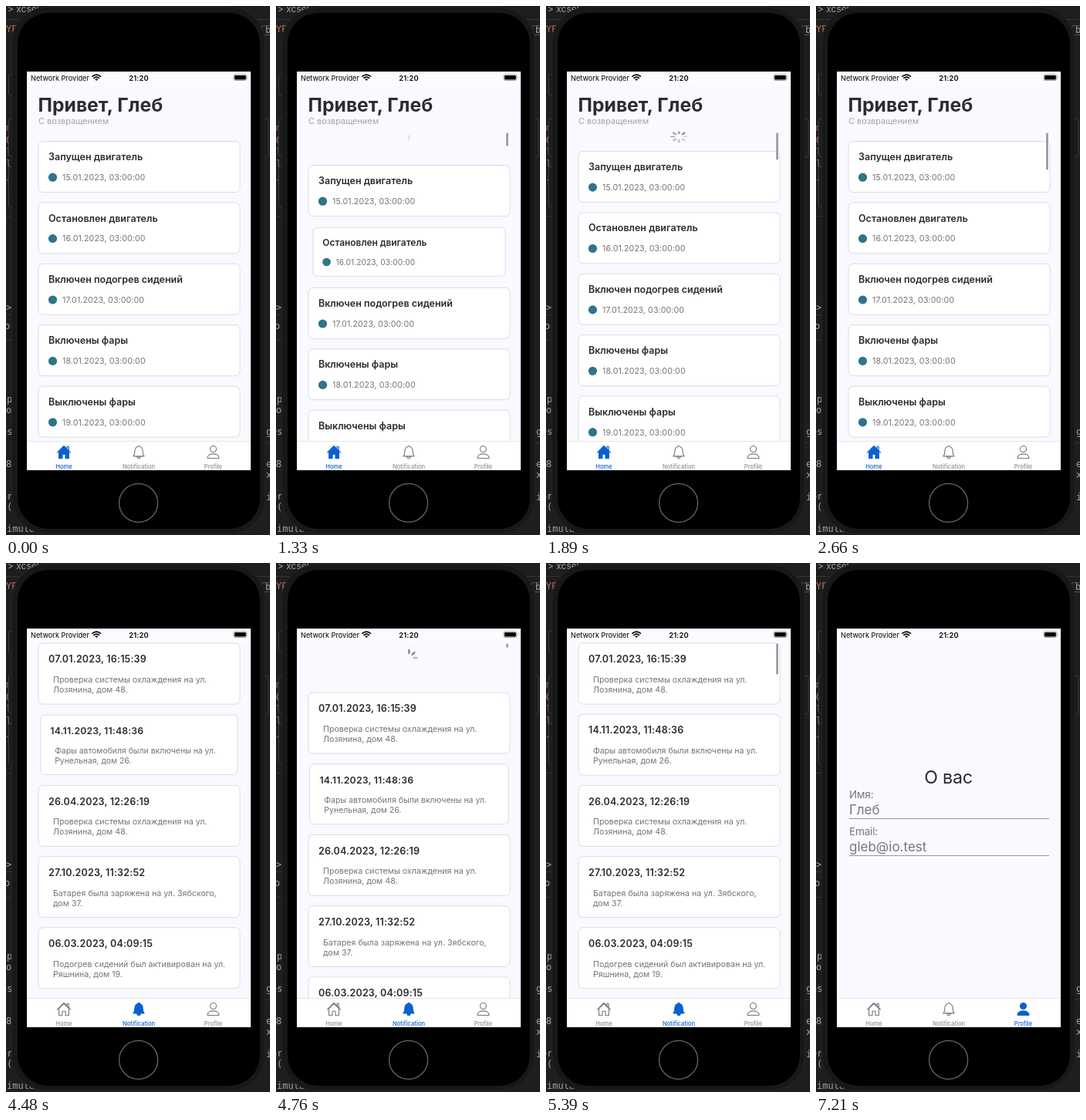
An HTML page for the animation above (8000 ms loop, 342 by 686 pixels).

```html
<!DOCTYPE html>
<html lang="ru">
<head>
<meta charset="utf-8">
<style>
html, body { margin: 0; width: 100%; height: 100%; overflow: hidden; background: #1e1e1e; }
svg { display: block; width: 342px; height: 686px; font-family: Inter, Roboto, sans-serif; }
.code { font: 12px "DejaVu Sans Mono", monospace; fill: #a3a3a3; }
.title { font-size: 12.5px; font-weight: 600; fill: #2b2b30; }
.body { font-size: 10.65px; fill: #747476; }
.title.date { letter-spacing: .18px; }
.body.date { letter-spacing: .09px; }
.card rect { fill: #fff; stroke: #d9dce2; }
.tab { fill: none; stroke: #77777b; stroke-width: 1.1; stroke-linejoin: round; stroke-linecap: round; }
.tab text { font-size: 7.6px; font-weight: 500; fill: #8e8e93; stroke: none; text-anchor: middle; }
.tab.on { stroke: #0a60cf; }
.tab.on .shape { fill: #0a60cf; }
.tab.on text { fill: #0a60cf; }
</style>
</head>
<body>
<svg id="stage" viewBox="0 0 342 686"></svg>
<script>
const LOOP = 8000, STEP = 70;
const stage = document.getElementById('stage');

const text = (x, y, s, attrs = '') => `<text x="${x}" y="${y}" ${attrs}>${s}</text>`;
const rect = (x, y, w, h, r, attrs) =>
  `<rect x="${x}" y="${y}" width="${w}" height="${h}" rx="${r}" ${attrs}/>`;

// Cards are drawn around their own centre so that a press can scale them.
const card = (i, top, pitch, height, content) =>
  `<g class="card" data-y="${top + i * pitch + height / 2}">
    ${rect(-130.5, -height / 2, 261, height, 6, '')}
    <g transform="translate(-172.5 ${-height / 2})">${content}</g></g>`;

const events = ['Запущен двигатель', 'Остановлен двигатель', 'Включен подогрев сидений',
  'Включены фары', 'Выключены фары'];
const notices = [
  ['07.01.2023, 16:15:39', 'Проверка системы охлаждения на ул.', 'Лозянина, дом 48.'],
  ['14.11.2023, 11:48:36', 'Фары автомобиля были включены на ул.', 'Рунельная, дом 26.'],
  ['26.04.2023, 12:26:19', 'Проверка системы охлаждения на ул.', 'Лозянина, дом 48.'],
  ['27.10.2023, 11:32:52', 'Батарея была заряжена на ул. Зябского,', 'дом 37.'],
  ['06.03.2023, 04:09:15', 'Подогрев сидений был активирован на ул.', 'Ряшнина, дом 19.'],
];

const eventCards = events.map((name, i) => card(i, 175.5, 79.4, 66, `
  ${text(55, 24.7, name, 'class="title"')}
  <circle cx="60.5" cy="46.7" r="5.6" fill="#2f7488"/>
  ${text(73, 50.5, `${15 + i}.01.2023, 03:00:00`, 'class="body date"')}`)).join('');

const noticeCards = notices.map(([date, a, b], i) => card(i, 104, 92.2, 79, `
  ${text(55, 25.2, date, 'class="title date"')}
  ${text(61, 51, a, 'class="body"')}${text(61, 64, b, 'class="body"')}`)).join('');

const scroller = (id, top, cards) => `
  <clipPath id="${id}Clip"><rect x="27" y="${top}" width="290" height="${564 - top}"/></clipPath>
  <g clip-path="url(#${id}Clip)">
    <g id="${id}Spinner" stroke="#8b8b8e" stroke-width="2.6" stroke-linecap="round">${
      [...Array(8)].map((_, i) => `<path d="M0-6.3V-10" transform="rotate(${i * 45})"/>`).join('')}</g>
    <g id="${id}Cards">${cards}</g>
    ${rect(298.3, top + 1.5, 2.4, 48, 1.2, `id="${id}Bar" fill="#8f8f92"`)}
  </g>`;

const tab = (x, label, icon) =>
  `<g class="tab" transform="translate(${x} 578.5)">${icon}${text(0, 21.5, label)}</g>`;

const tabs = tab(75, 'Home', `
    <path class="shape" d="M-6.4-.8V8.2H-2V2.8H2V8.2H6.4V-.8L0-7Z"/>
    <path d="M-8.6 .6L0-8 8.6 .6M4-4.4V-7.2H6.2V-2"/>`) +
  tab(172, 'Notification', `
    <path class="shape" d="M-7 5.4C-4.8 3.2-5.4 0-5-2.6C-4.5-5.4-2.6-6.8-1.2-7C-1-8.6 1-8.6 1.2-7
      C2.6-6.8 4.5-5.4 5-2.6C5.4 0 4.8 3.2 7 5.4Z"/>
    <path class="shape" d="M-2.2 5.8C-2 9 2 9 2.2 5.8Z"/>`) +
  tab(268.5, 'Profile', `
    <circle class="shape" cy="-4" r="4"/>
    <path class="shape" d="M-7.4 8C-7.8 3.8-3.6 2.4 0 2.4S7.8 3.8 7.4 8Z"/>`);

const editor = `
  <rect width="342" height="686" fill="#1e1e1e"/>
  <path d="M0 17.5H342M0 272.5H8M0 400.5H8M0 433.5H8M335 566.5H342" stroke="#343434"/>
  <g class="code">
    ${text(2, 8, '&gt; xcsel', 'font-family="Inter, sans-serif"')}
    ${[[0, 395, '&gt;'], [-2, 419, 'or'], [1, 514, 'p'], [0, 528, 'o.'],
       [-6, 556, 'es'], [0, 598, '84'], [-6, 640, 'er'], [1, 654, '('], [1, 682, 'imulat'],
       [337, 556, 'g'], [337, 598, 'e'], [337, 612, 'x'], [337, 641, 'i']]
      .map(([x, y, s]) => text(x, y, s)).join('')}
    <g fill="#b0705c">${[[34, 'YP'], [162, 'm'], [178, '0'], [194, 'l'], [209, 'l'], [232, 'f:']]
      .map(([y, s]) => text(0, y, s)).join('')}</g>
    ${text(336, 35, 'b')}
  </g>
  ${rect(331.5, 25.5, 14, 12, 2, 'fill="none" stroke="#555"')}`;

const phone = `
  <g fill="#1b1b1c" stroke="#3c3c3d">
    ${rect(3.5, 88.5, 8, 27, 2, '')}${rect(3.5, 146.5, 8, 48, 2, '')}
    ${rect(3.5, 208.5, 8, 52, 2, '')}${rect(332, 146.5, 8, 49, 2, '')}
  </g>
  ${rect(7.5, 1.5, 328, 683, 46, 'fill="#171819" stroke="#222324"')}
  ${rect(15, 9, 314, 669, 40, 'fill="#000"')}
  <circle cx="171.6" cy="644.4" r="25" fill="none" stroke="#666668" stroke-width="1.3"/>
  ${rect(27, 85, 290, 517, 0, 'fill="#f9faff"')}`;

const statusBar = `
  ${rect(27, 85, 290, 18, 0, 'fill="#fbfcff"')}
  ${text(32, 96.6, 'Network Provider', 'font-size="9.2"')}
  ${text(172, 96.6, '21:20', 'font-size="9.3" font-weight="600" letter-spacing=".2" text-anchor="middle"')}
  <g fill="none" stroke="#000" stroke-width="1.7">
    <path d="M111.4 91.6Q117.2 86.7 123 91.6M113.4 93.8Q117.2 90.6 121 93.8"/>
    <path d="M115.2 95L117.2 97 119.2 95Q117.2 93.4 115.2 95Z" fill="#000" stroke="none"/>
  </g>
  ${rect(294.9, 88.9, 17, 7.6, 2.2, 'fill="none" stroke="#8a8a8c" stroke-width=".8"')}
  ${rect(296, 90, 14.8, 5.4, 1.2, '')}
  <path d="M313 91.3Q314.4 92.7 313 94.1Z" fill="#8a8a8c"/>`;

const home = `<g class="screen">
  ${text(41.5, 137, 'Привет, Глеб', 'font-size="24.7" font-weight="700" fill="#2b2b30"')}
  ${text(42, 153, 'С возвращением', 'font-size="10.9" fill="#a3a3a6"')}
  ${scroller('home', 163, eventCards)}</g>`;

const notifications = `<g class="screen">${scroller('notes', 103, noticeCards)}</g>`;

const profile = `<g class="screen" fill="#77777a">
  ${text(171.5, 285.5, 'О вас', 'font-size="23.2" letter-spacing="-.2" text-anchor="middle" fill="#2b2b30"')}
  ${text(43, 305, 'Имя:', 'font-size="13.6" letter-spacing="-.2"')}
  ${text(43, 326, 'Глеб', 'font-size="17"')}
  ${text(43, 353, 'Email:', 'font-size="13.6" letter-spacing="-.2"')}
  ${text(43, 374, 'gleb@io.test', 'font-size="17"')}
  <path d="M43 331.5H302M43 379.5H302" stroke="#98989b"/></g>`;

stage.innerHTML = editor + phone + home + notifications + profile + statusBar +
  rect(27, 564, 290, 38, 0, 'fill="#fff"') +
  '<path d="M27 564.5H317" stroke="#e4e6eb"/>' + tabs;

const $ = id => document.getElementById(id);
const clamp = (v, lo = 0, hi = 1) => Math.min(hi, Math.max(lo, v));

// Linear interpolation through [time, value] pairs.
function track(keys, t) {
  if (t <= keys[0][0]) return keys[0][1];
  for (let i = 1; i < keys.length; i++) {
    const [t0, a] = keys[i - 1], [t1, b] = keys[i];
    if (t < t1) return a + (b - a) * (t - t0) / (t1 - t0);
  }
  return keys[keys.length - 1][1];
}

const lists = [
  { id: 'home', top: 163, bar: 48, show: 1330, fade: 3080, refreshes: true,
    drag: [[1260, 0], [1330, 31], [1400, 68], [1470, 102], [1540, 125]],
    press: [[1120, 1], [1190, .97], [1260, .97], [1330, .955], [1540, 1]] },
  { id: 'notes', top: 103, bar: 40, show: 4620, fade: 6020, refreshes: false,
    drag: [[4550, 0], [4620, 16], [4690, 41], [4760, 64], [4830, 76]],
    press: [[4410, 1], [4480, .98], [4550, .96], [4620, .955], [4760, .988], [4830, 1]] },
];

// After release the list returns like a critically damped spring.
function pullOffset(drag, t) {
  const [released, peak] = drag[drag.length - 1];
  if (t <= released) return track(drag, t);
  const x = 11 * (t - released) / 1000;
  const offset = peak * (1 + x) * Math.exp(-x);
  return offset < 1.2 ? 0 : offset;
}

function drawList({ id, top, bar, show, fade, refreshes, drag, press }, t) {
  const offset = pullOffset(drag, t);
  const released = drag[drag.length - 1][0];
  const spinning = refreshes && t >= released;

  $(id + 'Cards').setAttribute('transform', `translate(172.5 ${offset})`);
  [...$(id + 'Cards').children].forEach((el, i) =>
    el.setAttribute('transform', `translate(0 ${el.dataset.y}) scale(${i === 1 ? track(press, t) : 1})`));

  $(id + 'Bar').setAttribute('height', Math.max(5, bar - offset));
  $(id + 'Bar').setAttribute('opacity', t < show ? 0 : track([[fade - STEP, 1], [fade + STEP, 0]], t));

  const spinner = $(id + 'Spinner');
  const squash = spinning ? track([[1680, 1], [1960, .6]], t) : 1;
  spinner.setAttribute('transform',
    `translate(172.3 ${top + Math.min(offset / 2, 20)}) scale(1 ${squash})`);
  spinner.setAttribute('opacity', spinning ? track([[1960, 1], [2240, 0]], t) : 1);
  const ticks = 8 * clamp((offset - 22) / 85) ** 1.6;
  const phase = Math.floor((t - released) / 125);
  [...spinner.children].forEach((tick, i) =>
    tick.setAttribute('opacity', spinning ? .35 + .65 * (((i - phase) % 8 + 8) % 8) / 7 : clamp(ticks - i)));
}

function draw(time) {
  const t = Math.floor(time % LOOP / STEP) * STEP;
  const active = t < 3290 ? 0 : t < 6230 ? 1 : 2;
  stage.querySelectorAll('.screen').forEach((el, i) => el.setAttribute('display', i === active ? 'inline' : 'none'));
  stage.querySelectorAll('.tab').forEach((el, i) => el.classList.toggle('on', i === active));
  lists.forEach(list => drawList(list, t));
}

const start = performance.now();
function loop() {
  draw(performance.now() - start);
  requestAnimationFrame(loop);
}
loop();
</script>
</body>
</html>
```
